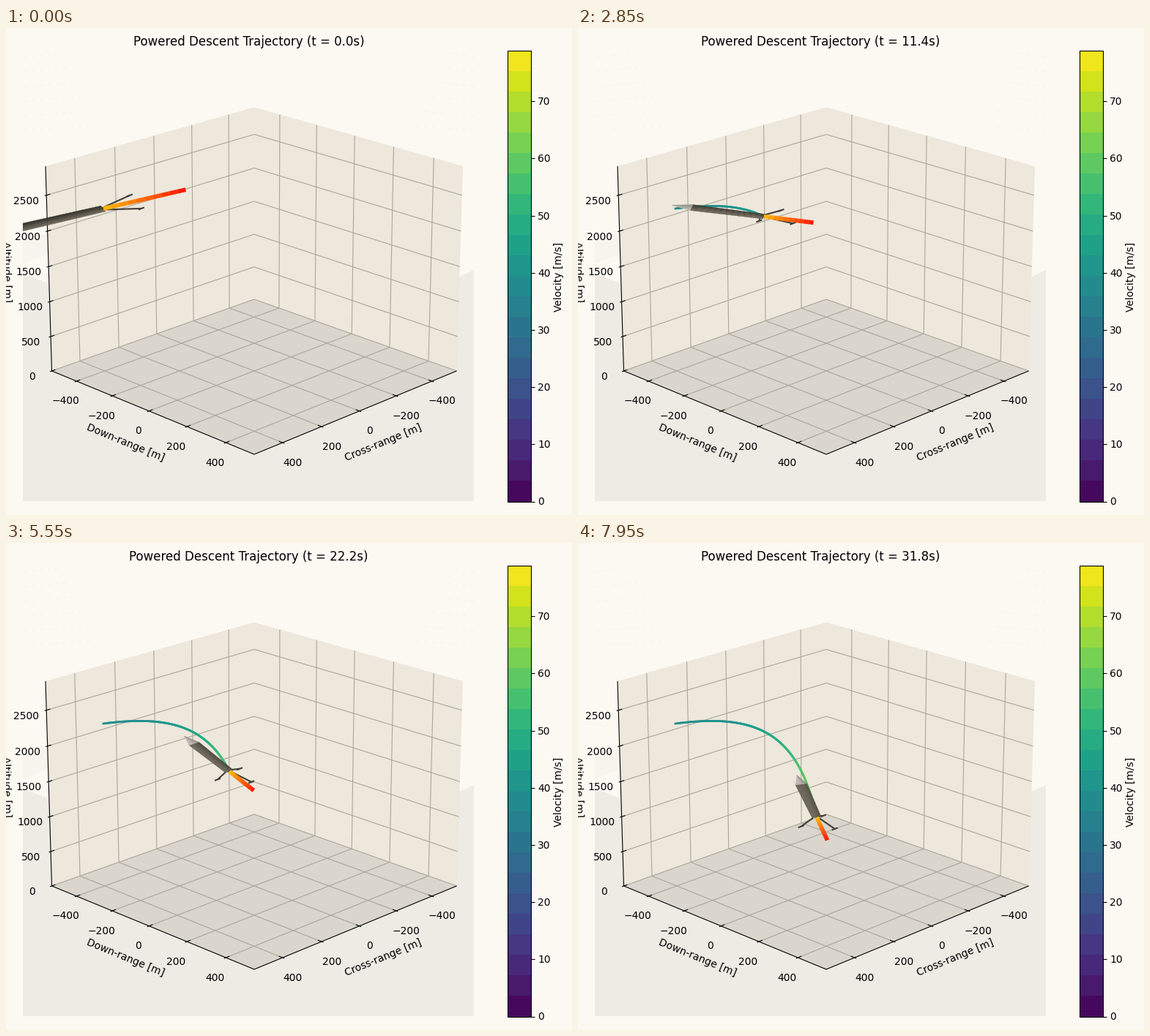
A matplotlib script for the animation above (8000 ms loop, 773 by 666 pixels).

```python
import numpy as np
import matplotlib.pyplot as plt
from matplotlib.animation import FuncAnimation
from matplotlib.collections import LineCollection, PolyCollection
from matplotlib.patches import Polygon, Rectangle

W, H = 773, 666
FRAMES, STEP = 160, 50
L, TOP = 541.67, 2900
TICKS = range(-400, 401, 200)
BG, WALL, FLOOR, GROUND, GRID = "#fcf9f3", "#ede7dc", "#dad5cd", "#eeeae4", "#aaa799"
viridis = plt.get_cmap("viridis")

plt.rcParams["font.family"] = "DejaVu Sans"
fig = plt.figure(figsize=(W / 100, H / 100), dpi=100, facecolor=BG)
ax = fig.add_axes([0, 0, 1, 1])
ax.set_xlim(0, W)
ax.set_ylim(H, 0)
ax.axis("off")
view = Rectangle((23, 31), 616, 616, fc="none", ec="none")
ax.add_patch(view)


def project(cross, down, alt):
    """Perspective view of the plot box, in pixels."""
    p = (down + cross) / (2 * L)
    q = (down - cross) / (2 * L)
    z = alt / TOP
    w = 1 - 0.0755 * p - 0.0298 * z
    return 339 + 276.5 * q / w, (469 + 70 * p - 285.6 * z) / w


def trace(*points):
    return [project(*c) for c in points]


def lines(segs, color, width, z, **kw):
    return ax.add_collection(
        LineCollection(segs, colors=color, linewidths=width, zorder=z, **kw),
        autolim=False)


def area(pts, color, z):
    ax.add_patch(Polygon(pts, fc=color, ec="none", zorder=z)).set_clip_path(view)


def label(x, y, text, size=10, ha="center", va="baseline", rot=0):
    return ax.text(x, y, text, fontsize=size, ha=ha, va=va, rotation=rot, zorder=20)


def number(v):
    return str(v).replace("-", "\u2212")


# distant ground and faint haze
area([(23, 336), (60, 350), (618, 341), (639, 331), (639, 647), (23, 647)], GROUND, 1)
area([(23, 290), (60, 280), (60, 308), (23, 322)], "#f7f4ee", 1)
haze = []
for k in range(6):
    y = 34 + 20 * k
    haze += [[(25, y + 6), (75 + 9 * k, y)], [(639, y + 6), (603 - 9 * k, y)]]
lines(haze, "#f5f2ec", 0.7, 1, linestyles=(0, (4, 7)))

# panes
area(trace((-L, -L, 0), (-L, -L, TOP), (L, -L, TOP), (L, -L, 0)), WALL, 2)
area(trace((-L, -L, 0), (-L, -L, TOP), (-L, L, TOP), (-L, L, 0)), WALL, 2)
area(trace((-L, -L, 0), (L, -L, 0), (L, L, 0), (-L, L, 0)), FLOOR, 2)

# grid, axis lines and ticks
grid, marks = [], []
for v in TICKS:
    grid.append(trace((v, L, 0), (v, -L, 0), (v, -L, TOP)))
    grid.append(trace((L, v, 0), (-L, v, 0), (-L, v, TOP)))
    marks.append(trace((L + 9, v, 0), (L - 18, v, 0)))
    marks.append(trace((v, L + 9, 0), (v, L - 18, 0)))
    x, y = project(L, v, 0)
    label(x - 14.5, y + 31.5, number(v))
    label(2 * 339 - x + 14, y + 31.5, number(v))
for a in range(0, 2501, 500):
    grid.append(trace((L, -L, a), (-L, -L, a), (-L, L, a)))
    marks.append(trace((L + 9, -L, a), (L - 18, -L, a)))
    x, y = project(L, -L, a)
    label(36 - 1.7 * a / 500, y + 12, number(a))
marks.append(trace((L, -L, TOP), (L, -L, 0), (L, L, 0), (-L, L, 0)))
lines(grid, GRID, 0.8, 3)
lines(marks, "black", 0.8, 4)

label(163.5, 567, "Down-range [m]", va="center", rot=-22.4)
label(515.5, 567, "Cross-range [m]", va="center", rot=22.4)
label(0, 333, "Altitude [m]", va="center", rot=-88.4)
title = label(331.5, 23.5, "", size=12)

# colour bar
BANDS, BAR_TOP, BAR_H = 22, 31, 616.5
for k in range(BANDS):
    ax.add_patch(Rectangle((685, BAR_TOP + BAR_H * k / BANDS), 32, BAR_H / BANDS,
                           fc=viridis(1 - (k + 0.5) / BANDS), ec="none", zorder=5, aa=False))
ax.add_patch(Rectangle((685, BAR_TOP), 32, BAR_H, fc="none", ec="black", lw=0.8, zorder=6))
for v in range(0, 80, 10):
    y = BAR_TOP + BAR_H - 7.82 * v
    lines([[(717, y), (721.9, y)]], "black", 0.8, 6)
    label(726, y + 5, str(v), ha="left")
label(754.5, 340, "Velocity [m/s]", va="center", rot=90)


def position(t):
    """Engine end of the rocket, gliding in towards the pad."""
    x = 339 - 206 * np.exp(-0.305 * t - 0.00067 * t ** 3)
    y = 247 - 8.2 * t + 4.85 * t ** 2 - 0.225 * t ** 3
    return np.stack([x, y], axis=-1)


def heading(t):
    """Vector from engine to nose; it shortens and swings upright."""
    return np.array([-208 * np.exp(-0.134 * t - 0.0155 * t ** 2),
                     108 * np.exp(-0.22 * t - 0.032 * t ** 2) - 60])


def rim(axis, rx=8, ry=4):
    """Silhouette half-width of an elliptical tube seen along its axis."""
    normal = np.array([-axis[1], axis[0]]) / np.hypot(*axis)
    radii = np.array([rx, ry])
    return radii ** 2 * normal / np.hypot(*(radii * normal))


def mix(a, b, s):
    return np.array(a) + (np.array(b) - np.array(a)) * s


clock = np.arange(FRAMES) * STEP / 1000
END = clock[-1]
track = position(clock)
track_segs = np.stack([track[:-1], track[1:]], axis=1)
u = clock[1:] / END
track_cols = viridis(0.49 + 0.3 * u * u * (3 - 2 * u))

leg_angles = np.radians([40, 160, 280])
LEGS = np.stack([27 * np.cos(leg_angles), 11 * np.sin(leg_angles)], axis=1)
PAD = np.array([4, -1.5])
STRIPS, SPARKS = 7, 10
path = lines([], "black", 2, 8, capstyle="projecting")
legs = lines([], "#403e37", 1.5, 9)
hull = ax.add_collection(PolyCollection([], linewidths=0.3, zorder=10), autolim=False)
flame = lines([], [mix((1, 0.7, 0.03), (1, 0.1, 0), k / (SPARKS - 1)) for k in range(SPARKS)],
              4.2, 11, capstyle="butt")
for part in (path, legs, hull, flame):
    part.set_clip_path(view)


def draw(n):
    t = clock[n]
    title.set_text(f"Powered Descent Trajectory (t = {n * 0.2:.1f}s)")
    path.set_segments(track_segs[:n])
    path.set_color(track_cols[:max(n, 1)])

    base, axis = position(t), heading(t)
    tip, neck = base + axis, base + 0.79 * axis
    half = rim(axis) * (1 + 0.3 * np.exp(-t))

    segs = []
    for side in LEGS:
        foot = base - 0.15 * axis + side
        segs += [[base + 0.2 * side, foot], [foot - PAD, foot + PAD]]
    legs.set_segments(segs)

    # lit from the lower left; the far side brightens as the body turns upright
    turn = t / END
    dark = mix((50, 48, 42), (88, 83, 73), turn)
    quads, cols = [], []
    for k in range(STRIPS):
        a, b = 2 * k / STRIPS - 1, 2 * (k + 1) / STRIPS - 1
        s = (k / (STRIPS - 1)) ** (1 + turn)
        quads.append([base + 0.8 * a * half, base + 0.8 * b * half,
                      neck + b * half, neck + a * half])
        cols.append(mix((109, 103, 91), dark, s) / 255)
        quads.append([neck + a * half, neck + b * half, tip, tip])
        cols.append(mix((192, 187, 180), (148, 143, 136), s) / 255)
    hull.set_verts(quads)
    hull.set_facecolor(cols)
    hull.set_edgecolor(cols)

    pts = [base - 0.54 * axis * k / SPARKS for k in range(SPARKS + 1)]
    flame.set_segments([pts[k:k + 2] for k in range(SPARKS)])
    return title, path, legs, hull, flame


anim = FuncAnimation(fig, draw, frames=FRAMES, interval=STEP, init_func=lambda: draw(0),
                     repeat=True, blit=False)
plt.show()
```
